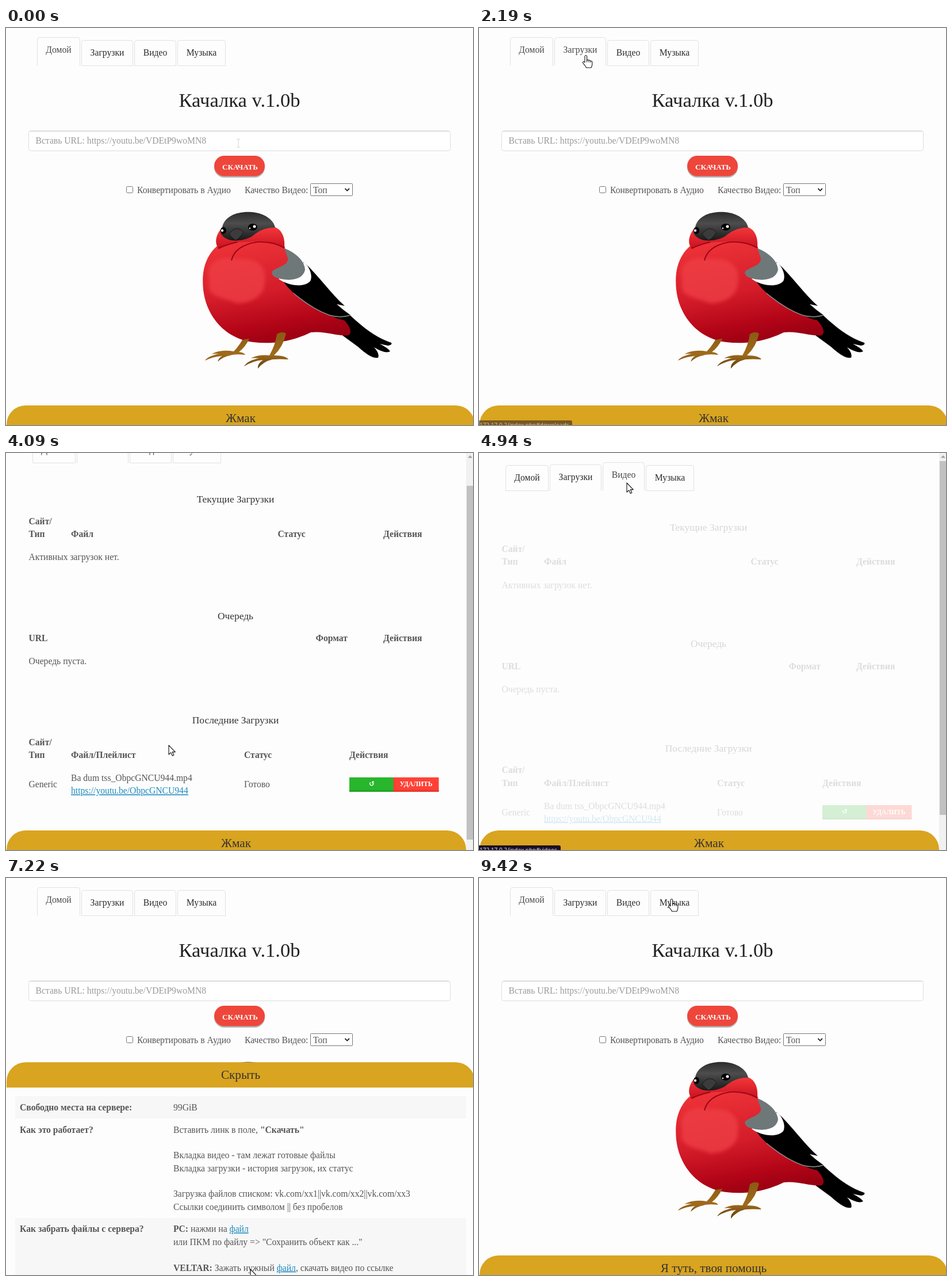
Recreate the animation shown at these times as an HTML page. Size 812 px wide and 690 px high, loop 9470 ms.

```html
<!DOCTYPE html>
<html lang="ru">
<head>
<meta charset="utf-8">
<title>Качалка</title>
<style>
html, body { margin: 0; width: 100%; height: 100%; overflow: hidden; background: #fdfdfd; }
svg { display: block; width: 812px; height: 690px; font: 15.65px 'Liberation Serif', serif; fill: #555; }
text { white-space: pre; }
.mid { text-anchor: middle; }
.b { font-weight: bold; }
.link { fill: #1e8bc0; text-decoration: underline; }
.dark { fill: #2b2b2b; }
.hint { fill: #999; }
.white { fill: #fff; }
.h1 { font-size: 34.5px; fill: #222; }
.h5 { font-size: 17.4px; fill: #333; }
.big { font-size: 21.2px; fill: #333; }
.btn { font-size: 13.2px; }
.small { font-size: 11.7px; }
.line { fill: none; stroke: #e1e1e1; }
.field { fill: #fff; stroke: #767676; }
.stripe { fill: #f7f7f7; }
.status text { font: 10px 'Open Sans', sans-serif; fill: #eee; }
.pointer path { stroke: #111; stroke-width: 1.1; fill: #fff; stroke-linejoin: round; }
</style>
</head>
<body>
<svg id="stage" viewBox="0 0 812 690" xmlns="http://www.w3.org/2000/svg">
<defs>
  <linearGradient id="belly" x1="0.35" y1="0" x2="0.6" y2="1">
    <stop offset="0" stop-color="#ee3338"/><stop offset=".5" stop-color="#d41c2a"/>
    <stop offset=".8" stop-color="#b30517"/><stop offset="1" stop-color="#960012"/>
  </linearGradient>
  <linearGradient id="cheek" x1="0" y1="0" x2="0" y2="1">
    <stop offset="0" stop-color="#f5393c"/><stop offset="1" stop-color="#c8101f"/>
  </linearGradient>
  <linearGradient id="cap" x1="0" y1="0" x2="0" y2="1">
    <stop offset="0" stop-color="#2c2c2c"/><stop offset=".4" stop-color="#4d4d4d"/><stop offset="1" stop-color="#191919"/>
  </linearGradient>
  <linearGradient id="leg" gradientUnits="userSpaceOnUse" x1="0" y1="530" x2="0" y2="592">
    <stop offset="0" stop-color="#8a5a14"/><stop offset=".6" stop-color="#a06a1c"/><stop offset="1" stop-color="#5f3d0c"/>
  </linearGradient>
  <filter id="soft" x="-20%" y="-20%" width="140%" height="140%"><feGaussianBlur stdDeviation="3"/></filter>
  <g id="bird">
    <path fill="#000" d="M560 490L598 499C620 520 645 539 670 547Q672 551 664 552L650 549Q664 556 668 562Q660 567 640 555Q650 566 647 573Q636 576 612 554L586 535Z"/>
    <path fill="url(#belly)" d="M368 378C345 398 340 425 343 455C348 500 380 540 430 546C465 550 500 544 530 529C555 526 580 537 596 534C602 530 599 519 588 508C550 500 520 470 492 405L482 372C450 360 400 362 368 378Z"/>
    <path fill="#f04046" opacity=".75" filter="url(#soft)" d="M352 420C360 400 380 396 405 402C430 398 455 412 450 440C452 465 425 480 400 478C385 470 362 470 353 455Z"/>
    <path fill="#000" d="M518 407C545 432 565 462 589 483L575 480Q586 490 599 499C585 504 570 503 558 498C530 485 495 462 480 437Z"/>
    <path fill="none" stroke="#8b8b8b" stroke-width="1.5" d="M500 461C525 482 545 493 562 499Q582 505 599 499"/>
    <path fill="#fff" d="M519 407C530 419 533 432 529 440C518 452 490 448 474 436Z"/>
    <path fill="#6f7879" d="M484 383C505 391 519 405 520 420C516 440 488 441 468 433C461 429 460 423 467 420C480 413 491 411 490 400Z"/>
    <path fill="url(#cheek)" d="M373 350C362 365 364 378 371 384C386 375 405 371 424 372C445 368 468 372 484 382C486 362 478 346 461 345C448 346 436 353 427 362C410 372 382 370 373 350Z"/>
    <path fill="none" stroke="#9c0616" stroke-width="2" d="M392 404C396 386 412 376 436 372Q462 370 484 382M369 383Q382 377 402 372"/>
    <path fill="url(#cap)" d="M376 346C380 327 402 318 428 320C450 322 466 334 468 347C452 346 438 353 428 362C414 370 394 372 383 366C373 361 370 353 376 346Z"/>
    <path fill="#3b3b3b" stroke="#111" stroke-width=".8" d="M388 358Q400 341 413 355Q405 367 399 369Q392 364 388 358Z"/>
    <g fill="#000"><ellipse cx="378" cy="352" rx="5" ry="6"/><ellipse cx="429" cy="346" rx="8" ry="6"/></g>
    <g fill="#fff"><circle cx="376" cy="352" r="2.2"/><circle cx="432" cy="345" r="2.5"/><circle cx="424" cy="348" r="1.2"/></g>
    <path fill="url(#leg)" d="M411 542L423 540Q416 555 405 563Q414 564 416 568Q398 566 390 569Q378 571 368 580Q370 573 376 570Q360 571 346 578Q350 571 370 566Q362 566 357 567Q372 558 396 562Q404 554 411 542Z"/>
    <path fill="url(#leg)" d="M471 532Q480 526 487 531Q482 554 466 569Q486 569 491 576Q476 575 463 576Q447 580 438 592Q437 583 447 577Q430 578 414 588Q420 578 440 574Q432 573 426 574Q440 567 458 569Q468 552 471 532Z"/>
  </g>
</defs>
</svg>
<script>
const LOOP = 9470;
const stage = document.getElementById('stage');
const $ = id => document.getElementById(id);

const text = (x, y, s, cls = '') => `<text x="${x}" y="${y}" class="${cls}">${s}</text>`;
const rect = (x, y, w, h, attrs = '') => `<rect x="${x}" y="${y}" width="${w}" height="${h}" ${attrs}/>`;
const group = (id, body, cls = '') => `<g id="${id}" class="${cls}">${body}</g>`;
const span = (cls, s) => `<tspan class="${cls}">${s}</tspan>`;
const lines = (x, list) => list.map(([y, s, cls]) => text(x, y, s, cls)).join('');

// Tabs
const tabs = [['Домой', 54, 75], ['Загрузки', 131, 90], ['Видео', 223, 73], ['Музыка', 298, 84]];
const tabsMarkup = tabs.map(([name, x, w], i) =>
  `<path id="edge${i}" class="line"/>` + text(x + w / 2, 48, name, 'mid dark').replace('<text', `<text id="name${i}"`)).join('');

function drawTab(i, lift) {
  const [, x, w] = tabs[i], top = 21.5 - 5 * lift, l = x + .5, r = x + w - .5;
  $('edge' + i).setAttribute('d',
    `M${l} 65.5V${top + 4}q0-4 4-4H${r - 4}q4 0 4 4V65.5` + (lift > 0 ? '' : 'Z'));
  $('name' + i).setAttribute('y', 48 - 5 * lift);
  $('name' + i).style.fill = lift === 1 ? '#484848' : '#2b2b2b';
}

// Pages
const home =
  text(406, 137, 'Качалка v.1.0b', 'h1 mid') +
  rect(39.5, 178.5, 733, 35, 'rx="4" fill="#fff" stroke="#dcdcdc"') +
  rect(41, 179, 730, 1.5, 'fill="#e4e4e4"') +
  text(51.5, 200.5, 'Вставь URL: https://youtu.be/VDEtP9woMN8', 'hint') +
  rect(362, 225, 88, 35, 'rx="17.5" fill="#b5b5b5"') +
  rect(362, 222, 88, 35.5, 'rx="17.5" fill="#ee463b"') +
  text(407, 245.5, 'СКАЧАТЬ', 'mid b btn white') +
  rect(209.5, 275.5, 11, 11, 'rx="2" class="field"') +
  text(228, 286.5, 'Конвертировать в Аудио') +
  text(415, 286.5, 'Качество Видео:') +
  rect(529.5, 270.5, 73, 21, 'rx="1" class="field"') +
  text(534, 286.5, 'Топ') +
  '<path d="M589.5 279l3.7 3.8 3.7-3.8" fill="none" stroke="#222" stroke-width="1.8"/>' +
  '<use href="#bird"/>';

const removeButton = (x, y) =>
  rect(x, y, 79, 25, 'fill="#ff4136"') + rect(x, y + 22, 79, 3, 'fill="#e8372d"') +
  text(x + 39.5, y + 15.5, 'УДАЛИТЬ', 'mid b small white');

const downloads =
  lines(399, [[134.5, 'Текущие Загрузки', 'h5 mid'], [337, 'Очередь', 'h5 mid'], [518.5, 'Последние Загрузки', 'h5 mid']]) +
  lines(39.5, [[172, 'Сайт/', 'b'], [194, 'Тип', 'b'], [234.5, 'Активных загрузок нет.'], [375.5, 'URL', 'b'],
    [415.5, 'Очередь пуста.'], [556, 'Сайт/', 'b'], [578.5, 'Тип', 'b'], [629.5, 'Generic']]) +
  lines(113, [[194, 'Файл', 'b'], [578.5, 'Файл/Плейлист', 'b'], [618.5, 'Ba dum tss_ObpcGNCU944.mp4'],
    [640.5, 'https://youtu.be/ObpcGNCU944', 'link']]) +
  text(472.5, 194, 'Статус', 'b') + text(538.5, 375.5, 'Формат', 'b') +
  lines(656, [[194, 'Действия', 'b'], [375.5, 'Действия', 'b']]) +
  lines(414, [[578.5, 'Статус', 'b'], [629.5, 'Готово']]) + text(597, 578.5, 'Действия', 'b') +
  rect(597, 612, 77, 25, 'fill="#28b62c"') + rect(597, 634, 77, 3, 'fill="#23a127"') +
  '<text x="636" y="627" class="mid b white" style="font:bold 12px \'DejaVu Sans\',sans-serif">↺</text>' +
  removeButton(673.5, 612);

const videos =
  text(406, 134.5, 'Видео', 'h5 mid') + text(39.5, 172, 'Файл', 'b') + text(656, 172, 'Действия', 'b') +
  text(39.5, 213, 'Ba dum tss_ObpcGNCU944.mp4', 'link') + removeButton(656, 196);

// Sliding help panel, laid out in its open position
const panel =
  rect(1, 123, 814, 100, 'id="lid" rx="33" fill="#d9a41f"') +
  rect(0, 167, 815, 600, 'fill="#fdfdfd"') +
  text(408, 151.5, '', 'big mid').replace('<text', '<text id="label"') +
  [[182, 39], [394, 105], [628, 39]].map(([y, h]) => rect(16, y, 784, h, 'class="stripe"')).join('') +
  lines(24, [[206.5, 'Свободно места на сервере:', 'b'], [245.5, 'Как это работает?', 'b'],
    [418, 'Как забрать файлы с сервера?', 'b'], [524, 'Ошибка?', 'b'], [653, 'Полезные ссылки', 'b']]) +
  lines(291, [
    [206.5, '99GiB'],
    [245.5, 'Вставить линк в поле, ' + span('b', '"Скачать"')],
    [290, 'Вкладка видео - там лежат готовые файлы'],
    [312.5, 'Вкладка загрузки - история загрузок, их статус'],
    [357, 'Загрузка файлов списком: vk.com/xx1||vk.com/xx2||vk.com/xx3'],
    [379.5, 'Ссылки соединить символом || без пробелов'],
    [418, span('b', 'PC:') + ' нажми на ' + span('link', 'файл')],
    [440.5, 'или ПКМ по файлу =&gt; "Сохранить объект как ..."'],
    [485.5, span('b', 'VELTAR:') + ' Зажать нужный ' + span('link', 'файл') + ', скачать видео по ссылке'],
    [524, 'Проверить корректность URL'],
    [546.5, 'Ссылка должна быть прямой и указывать на видео или плейлист'],
    [569, 'Файл уже скачан - ' + span('link', 'проверь историю') + ' или ' + span('link', 'имя файла')],
    [591.5, '"В процессе" - файл конвертируется в mp4'],
    [613.5, 'Бэкенд еще не поддерживает ваш ресурс'],
    [653, 'Видео в гиф', 'link']]);

const scrollbar = rect(800, 0, 12, 690, 'fill="#f1f1f1"') +
  rect(801, 14, 11, 615, 'id="thumb" fill="#c1c1c1"') + '<path d="M803 8.5l4-4.5 4 4.5z" fill="#a0a0a0"/>';

const status = (id, w, hash) =>
  group(id, rect(-4, 682, w + 4, 20, 'rx="3" fill="#1b1029"') + text(1, 694, '172.17.0.2/index.php#' + hash), 'status');

const pointers =
  group('arrow', '<path d="M0 0V16L3.8 12.6 6.3 18.2 8.8 17.1 6.3 11.6H11.3Z"/>', 'pointer') +
  group('hand', '<path d="M-2 1.5Q-2-.5-.2-.5T1.6 1.5V8Q3.6 6.6 5 8.3 7 7.4 8 9.3 10.8 8.8 10.8 11.5V15Q10.8 17.5 9 21H.5Q-1 17.5-4.5 13.8-6.3 11.5-4.8 10.6-3.5 10-2 12Z"/><path d="M1.6 8v3.5M5 8.6v3M8 9.5v2.6"/>', 'pointer') +
  group('beam', '<path d="M-3-7H-1Q0-7 0-6 0-7 1-7H3M0-6V6M-3 7H-1Q0 7 0 6 0 7 1 7H3" fill="none" stroke="#d2d2d2"/>');

stage.insertAdjacentHTML('beforeend',
  group('doc', tabsMarkup + group('home', home) + group('downloads', downloads) + group('videos', videos)) +
  group('bar', scrollbar) + group('panel', panel) +
  status('toDownloads', 162, 'downloads') + status('toVideos', 142, 'videos') + status('toHome', 139, 'home') +
  group('cursor', pointers));

// Tracks: [time, value...]
const lifts = [
  [[2340, 1], [2440, 0], [5330, 0], [5430, 1]],
  [[1990, 0], [2120, 1], [4860, 1], [4970, 0]],
  [[4640, 0], [4760, 1], [5440, 1], [5540, 0]],
  [[0, 0]]
];
const fades = {
  home: [[2340, 1], [2440, 0], [5550, 0], [5760, 1]],
  downloads: [[2440, 0], [2680, 1], [4830, 1], [4967, 0]],
  videos: [[4990, 0], [5190, 1], [5430, 1], [5540, 0]],
  toDownloads: [[2090, 0], [2290, 1], [2890, 1], [3090, 0]],
  toVideos: [[4700, 0], [4850, 1], [5150, 1], [5300, 0]],
  toHome: [[5380, 0], [5560, 1], [6400, 1], [6580, 0]]
};
const scroll = [[3540, 0], [3700, 53], [4060, 53], [4220, 0]];
const slide = [[6970, 0], [7400, 533], [9020, 533], [9330, 0]];
const path = [
  [50, 404, 200], [200, 580, 225], [500, 580, 225], [800, 565, 281], [1050, 215, 281], [1350, 405, 243],
  [1450, 405, 243], [2060, 186, 48], [2840, 186, 48], [3390, 283, 508], [4220, 283, 508], [4750, 257, 52],
  [5130, 257, 52], [5400, 92, 45], [6220, 92, 45], [6470, 425, 680], [7720, 425, 680], [7960, 485, 420],
  [8200, 445, 150], [8420, 445, 150], [8470, 445, 137], [9070, 445, 137], [9400, 335, 37]
];
const kinds = [
  [0, 'beam'], [90, 'arrow'], [1290, 'hand'], [1520, 'arrow'], [1980, 'hand'], [2900, 'arrow'], [4640, 'hand'],
  [4880, 'arrow'], [5320, 'hand'], [6260, 'arrow'], [6450, 'hand'], [7050, 'arrow'], [8190, 'hand'],
  [9100, 'arrow'], [9340, 'hand']
];
const labels = [[0, 'Жмак'], [6990, 'Скрыть'], [9050, 'Я туть, твоя помощь']];

const linear = p => p;
const swing = p => .5 - Math.cos(p * Math.PI) / 2;

function at(track, t, ease = linear) {
  const i = track.findIndex(k => k[0] > t);
  if (i === 0) return track[0].slice(1);
  if (i < 0) return track[track.length - 1].slice(1);
  const a = track[i - 1], b = track[i], p = ease((t - a[0]) / (b[0] - a[0]));
  return a.slice(1).map((v, j) => v + (b[j + 1] - v) * p);
}
const held = (track, t) => track.reduce((v, k) => k[0] <= t ? k[1] : v, track[0][1]);
const move = (id, x, y) => $(id).setAttribute('transform', `translate(${x} ${y})`);

function draw(t) {
  lifts.forEach((track, i) => drawTab(i, at(track, t)[0]));
  for (const id in fades) $(id).style.opacity = at(fades[id], t)[0];

  // A scrollbar narrows the layout while the long page is shown.
  const narrow = t >= 2440 && t < 4985;
  const dx = narrow ? -8 : 0;
  const [y] = at(scroll, t, swing);
  move('doc', 0, -y);
  tabs.forEach((_, i) => { move('edge' + i, dx, 0); move('name' + i, dx, 0); });
  $('bar').style.display = narrow ? '' : 'none';
  move('thumb', 0, y * .89);

  move('panel', 0, 533 - at(slide, t, swing)[0]);
  $('lid').setAttribute('width', narrow ? 799 : 814);
  $('label').setAttribute('x', 408 + dx);
  $('label').textContent = held(labels, t);

  move('cursor', ...at(path, t, swing));
  const kind = held(kinds, t);
  for (const id of ['arrow', 'hand', 'beam']) $(id).style.display = id === kind ? '' : 'none';
}

const start = performance.now();
function tick() {
  draw((performance.now() - start) % LOOP);
  requestAnimationFrame(tick);
}
tick();
</script>
</body>
</html>
```
